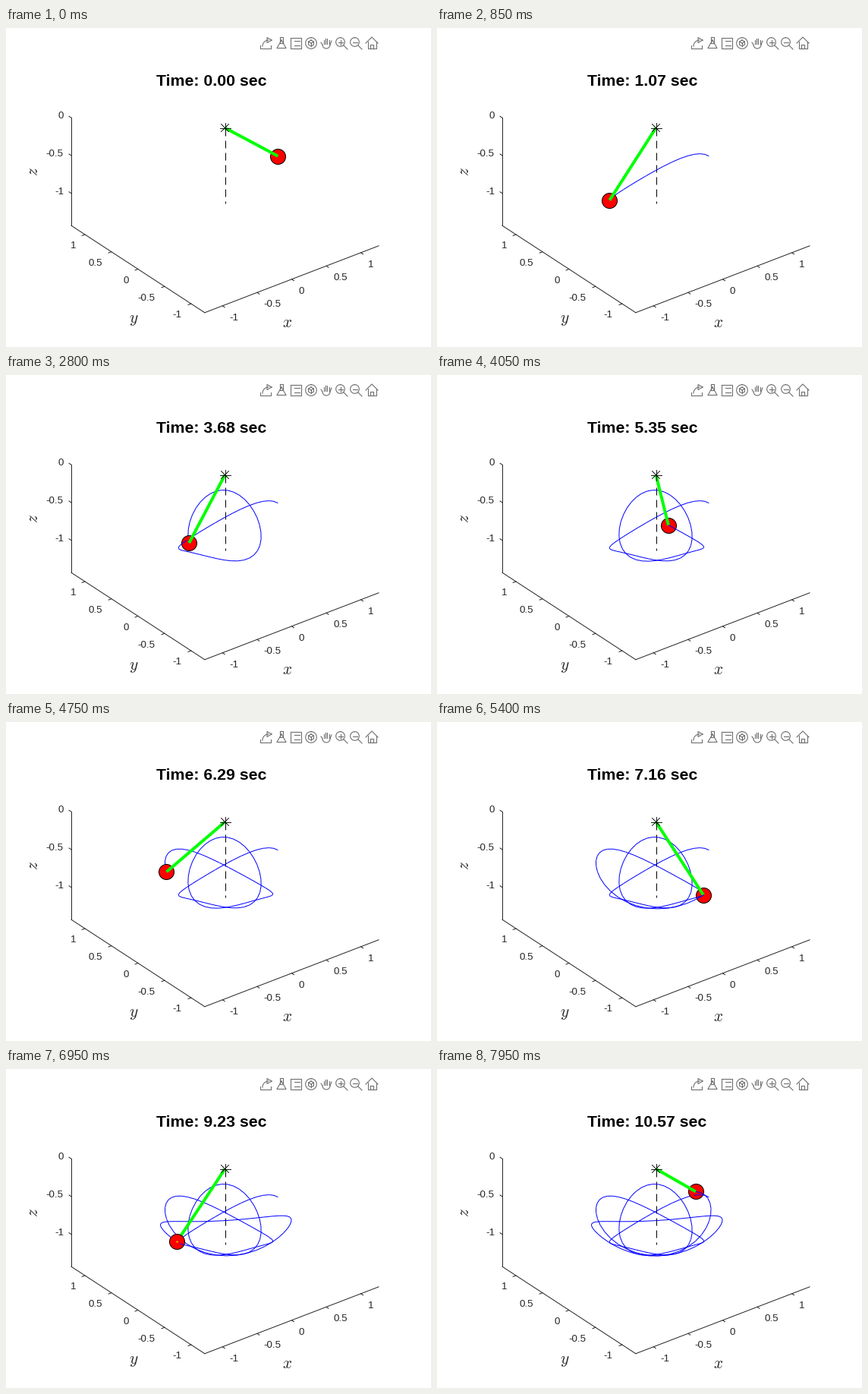
Recreate the animation shown at these times as a matplotlib script. Size 560 px wide and 420 px high, loop 8 s.

```python
import numpy as np
import matplotlib.pyplot as plt
from matplotlib.animation import FuncAnimation
from matplotlib.collections import LineCollection

W, H, DPI = 560, 420, 100
PX = 72 / DPI                      # points per pixel
FRAMES, STEP_MS = 160, 50
DT = 20 / 299                      # simulated seconds per step
GRAVITY = 4.905
THETA0, SPIN0 = np.radians(50), np.radians(75)
INK, ICON = "#262626", "#6e6e6e"

plt.rcParams["font.family"] = "Liberation Sans"
plt.rcParams["mathtext.fontset"] = "cm"

# Orthographic view: azimuth -37.5, elevation 30
AZ, EL, SCALE = np.radians(37.5), np.radians(30), 114.9
RIGHT = np.array([np.cos(AZ), -np.sin(AZ), 0])
UP = np.array([np.sin(AZ) * np.sin(EL), np.cos(AZ) * np.sin(EL), np.cos(EL)])
TOWARD = np.cross(RIGHT, UP)
PIVOT = np.array([288.5, 131.5])


def project(p):
    p = np.asarray(p, float)
    return PIVOT + SCALE * np.stack([p @ RIGHT, -(p @ UP)], axis=-1)


def slope(s):
    th, _, dth, dph = s
    return np.array([
        dth, dph,
        np.sin(th) * np.cos(th) * dph ** 2 - GRAVITY * np.sin(th),
        -2 * dth * dph / np.tan(th),
    ])


def simulate(count, sub=12):
    """Spherical pendulum of unit length, Runge-Kutta steps."""
    s, h = np.array([THETA0, 0, 0, SPIN0]), DT / sub
    out = [s]
    for _ in range(count - 1):
        for _ in range(sub):
            a = slope(s)
            b = slope(s + h / 2 * a)
            c = slope(s + h / 2 * b)
            d = slope(s + h * c)
            s = s + h / 6 * (a + 2 * b + 2 * c + d)
        out.append(s)
    th, ph = np.array(out)[:, :2].T
    return np.stack([np.sin(th) * np.cos(ph), np.sin(th) * np.sin(ph), -np.cos(th)], axis=1)


path = simulate(FRAMES - 1)
spots = project(path)
depth = path @ TOWARD
segments = np.stack([spots[:-1], spots[1:]], axis=1)
seg_depth = (depth[:-1] + depth[1:]) / 2

fig = plt.figure(figsize=(W / DPI, H / DPI), dpi=DPI, facecolor="white")
ax = fig.add_axes([0, 0, 1, 1])
ax.set_xlim(0, W)
ax.set_ylim(H, 0)
ax.axis("off")


def line(points, color=INK, width=1, **kw):
    x, y = np.transpose(points)
    return ax.plot(x, y, color=color, lw=width * PX, **kw)[0]


def label(pos, dx, dy, text, ha):
    ax.text(pos[0] + dx, pos[1] + dy + 4, text, color=INK, size=13.33 * PX,
            ha=ha, va="baseline")


def draw_axes():
    lim, tick, floor = 1.257, 0.042, -1.427
    lo, hi = -lim, lim
    corner, left = (lo, lo, floor), (lo, hi, floor)
    line(project([(hi, lo, floor), corner]))
    line(project([corner, left]))
    line(project([left, (lo, hi, 0)]))
    for v in np.arange(-1, 1.5, 0.5):
        text = f"{v:g}"
        p, q = project([(v, lo, floor), (v, lo - tick, floor)])
        line([p, q])
        label(p, 9, 15, text, "left")
        p, q = project([(lo, v, floor), (lo - tick, v, floor)])
        line([p, q])
        label(p, -12, 14.3, text, "right")
        if v <= 0:
            p, q = project([(lo, hi, v), (lo, hi + tick, v)])
            line([p, q])
            label(p, -10, -3, text, "right")
    for x, y, name, turn in ((371, 388, "x", 0), (168.5, 384, "y", 0), (37, 189, "z", 90)):
        ax.text(x, y, f"${name}$", color=INK, size=21.33 * PX, rotation=turn,
                ha="center", va="center")


def stroke(cx, *pts):
    line(np.array(pts) + (cx, 20), ICON, 1.1)


def ring(cx, r, sides=60, dx=0, dy=0, start=0, stop=360):
    a = np.radians(np.linspace(start, stop, sides + 1))
    line(np.stack([cx + dx + r * np.sin(a), 20 + dy - r * np.cos(a)], axis=1), ICON, 1.1)


def box(cx, w, h, dy=0):
    stroke(cx, (-w, dy - h), (w, dy - h), (w, dy + h), (-w, dy + h), (-w, dy - h))


def draw_icons():
    export, brush, tip, rotate, hand, zoom_in, zoom_out, home = (
        342, 363, 382, 402, 422, 442, 461, 482)

    stroke(export, (-7, 3), (-7, 7), (7, 7), (7, 3))
    ring(export, 8, dx=4, dy=4, start=-90, stop=0)
    ring(export, 4, 3, dx=4, dy=-4, start=90, stop=450)

    box(brush, 2, 4, -4)
    ring(brush, 7, 3, dy=3)

    box(tip, 7, 7)
    for y in (-3, 3):
        stroke(tip, (-2, y), (5, y))

    ring(rotate, 7.3)
    ring(rotate, 4, 6)
    for a in np.radians([60, 180, 300]):
        stroke(rotate, (0, 0), (4 * np.sin(a), -4 * np.cos(a)))

    for x in np.linspace(-3.5, 3.5, 4):
        stroke(hand, (x, 1), (x, abs(x) - 7.5))
    ring(hand, 5, start=90, stop=270, dy=2)
    stroke(hand, (-5, 2), (-7, -1))
    stroke(hand, (5, 2), (7, -3))

    for cx in (zoom_in, zoom_out):
        ring(cx, 5.8, dx=-1.5, dy=-1.5)
        stroke(cx, (2.8, 2.8), (8, 8))
        stroke(cx, (-4.5, -1.5), (1.5, -1.5))
    stroke(zoom_in, (-1.5, -4.5), (-1.5, 1.5))

    stroke(home, (-8, 0), (0, -8), (8, 0))
    stroke(home, (-5.5, -2), (-5.5, 7), (5.5, 7), (5.5, -2))
    box(home, 2, 2.5, 4.5)


def draw_pivot():
    line(project([(0, 0, 0), (0, 0, -1)]), "black", dashes=(10, 6),
         dash_capstyle="butt", zorder=2)
    for a in np.radians([0, 45, 90, 135]):
        arm = 7 * np.array([np.cos(a), np.sin(a)])
        line([PIVOT - arm, PIVOT + arm], "black", 0.9, zorder=8)


draw_axes()
draw_icons()
draw_pivot()

title = ax.text(197.6, 76, "", size=21.33 * PX, weight="bold", color="black",
                ha="left", va="baseline")
traces = [LineCollection([], colors="blue", linewidths=PX, zorder=z) for z in (3, 5, 7)]
for trace in traces:
    ax.add_collection(trace, autolim=False)
rod = line([PIVOT, PIVOT], "lime", 4, solid_capstyle="butt")
ball, = ax.plot([], [], "o", ms=20 * PX, mfc="red", mec="black", mew=PX)
rod_end, = ax.plot([], [], "o", ms=2.6 * PX, mfc="#c0b000", mew=0, zorder=6.5)


def update(frame):
    n = max(frame - 1, 0)
    x, y = spots[n]
    near = depth[n] > 0
    title.set_text(f"Time: {n * DT:.2f} sec")
    rod.set_data([PIVOT[0], x], [PIVOT[1], y])
    ball.set_data([x], [y])
    rod_end.set_data([x], [y])
    rod_end.set_visible(bool(near))
    rod.set_zorder(4 if near else 6)
    ball.set_zorder(6 if near else 4)

    # layer the trail behind, between and in front of rod and ball
    level = np.digitize(seg_depth[:n], sorted((0, depth[n])))
    for i, trace in enumerate(traces):
        trace.set_segments(list(segments[:n][level == i]))
    return [title, rod, ball, rod_end, *traces]


anim = FuncAnimation(fig, update, frames=FRAMES, interval=STEP_MS, repeat=True,
                     repeat_delay=0, blit=False)
plt.show()
```
